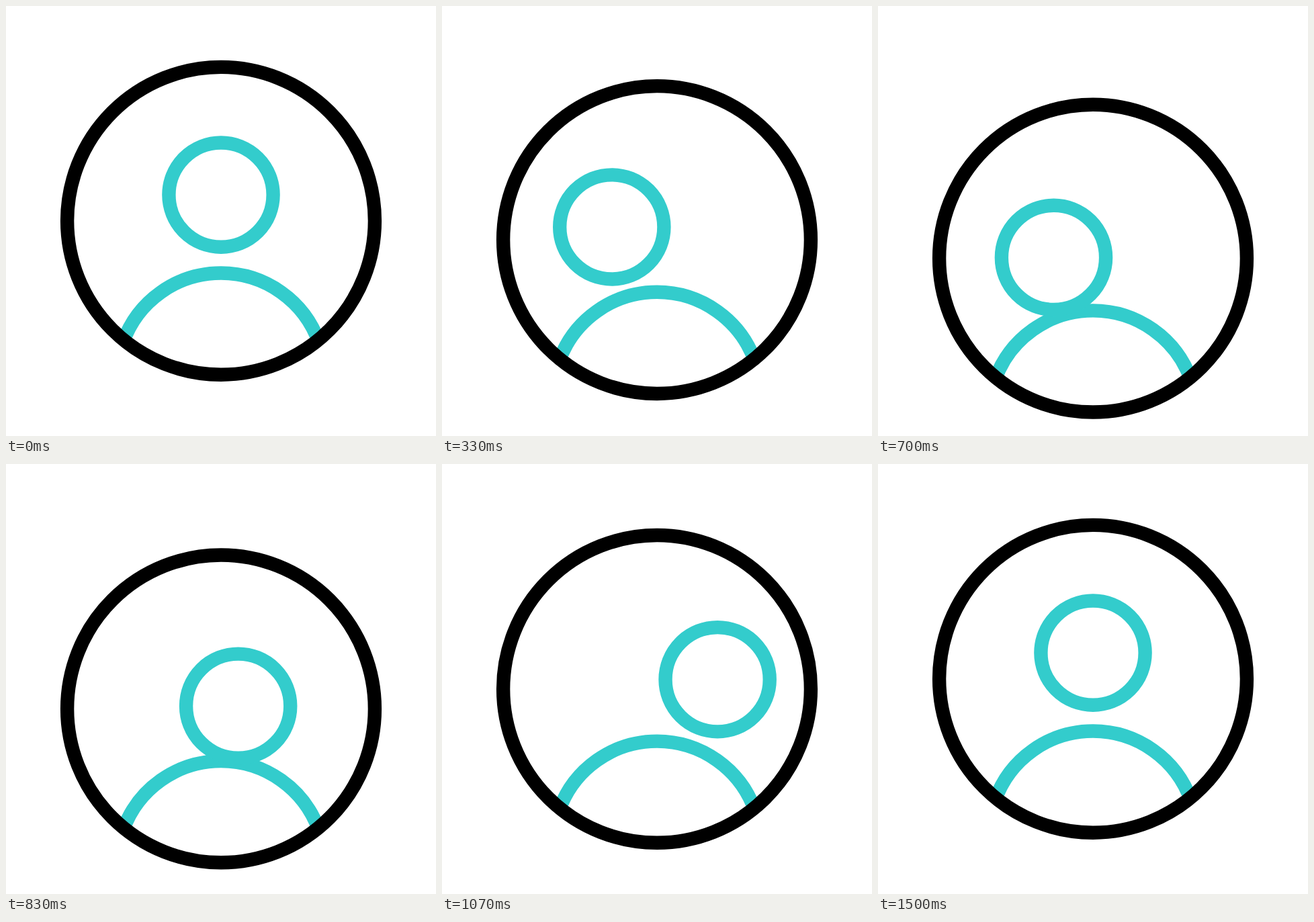
An HTML page that plays this animation: 640 by 640 pixels, repeating every 2 s.

```html
<!DOCTYPE html>
<html lang="en">
<head>
<meta charset="utf-8">
<title>Profile</title>
<style>
  html, body { margin: 0; width: 100%; height: 100%; overflow: hidden; background: #fff; }
  svg { display: block; width: 100vw; height: 100vh; }
  circle, path { fill: none; stroke: #3cc; stroke-width: 20.4; }
  .ring { stroke: #000; }
</style>
</head>
<body>
<svg viewBox="0 0 640 640">
  <g id="badge">
    <path d="M174 501.1A154.7 154.7 0 0 1 466 501.1"/>
    <circle class="ring" cx="320" cy="319.8" r="228.9"/>
    <circle id="head" cx="320" cy="281.1" r="77.6"/>
  </g>
</svg>
<script>
  const LOOP = 2000, FPS = 30;
  const badge = document.getElementById('badge');
  const head = document.getElementById('head');

  // Keys: [step, value, x1, x2]; x1 and x2 shape the ease that leads to the key.
  const DROP = [[0, 0], [20, 56.5, 1 / 3, 2 / 3], [38, 0, 0.275, 0.71]];
  const LEFT = -104.4, RIGHT = 93.4;
  const SWAY = [[0, 0], [16.75, LEFT, 1 / 3, 2 / 3], [30.35, RIGHT, 1 / 3, 2 / 3], [45, 0, 1 / 3, 2 / 3]];

  // Cubic bezier ease with flat ends: (x1, 0), (x2, 1).
  function ease(u, x1, x2) {
    let lo = 0, hi = 1, s = u;
    for (let i = 0; i < 24; i++) {
      s = (lo + hi) / 2;
      const r = 1 - s;
      if (3 * r * r * s * x1 + 3 * r * s * s * x2 + s * s * s < u) lo = s;
      else hi = s;
    }
    return s * s * (3 - 2 * s);
  }

  function valueAt(keys, step) {
    const i = keys.findIndex(k => k[0] > step);
    if (i < 0) return keys[keys.length - 1][1];
    const [t0, v0] = keys[i - 1], [t1, v1, x1, x2] = keys[i];
    return v0 + (v1 - v0) * ease((step - t0) / (t1 - t0), x1, x2);
  }

  const leftDip = x => -0.2056 * x + 0.00128 * x * x;
  const rightDip = x => 0.204 * x + 0.000757 * x * x;

  // Height of the head on its path: out to the left, across, back from the right.
  function headDip(step, x) {
    if (step < SWAY[1][0]) return leftDip(x);
    if (step >= SWAY[2][0]) return rightDip(x);
    const p = (x - LEFT) / (RIGHT - LEFT);
    const a = leftDip(LEFT), b = rightDip(RIGHT);
    return a + (b - a) * p + 24.4 * p * (1 - p);
  }

  function draw(ms) {
    const step = Math.floor((ms % LOOP + 5) * FPS / 1000);
    const x = valueAt(SWAY, step);
    badge.setAttribute('transform', `translate(0 ${valueAt(DROP, step)})`);
    head.setAttribute('transform', `translate(${x} ${headDip(step, x)})`);
  }

  const start = performance.now();
  function tick() {
    draw(performance.now() - start);
    requestAnimationFrame(tick);
  }
  tick();
</script>
</body>
</html>
```
